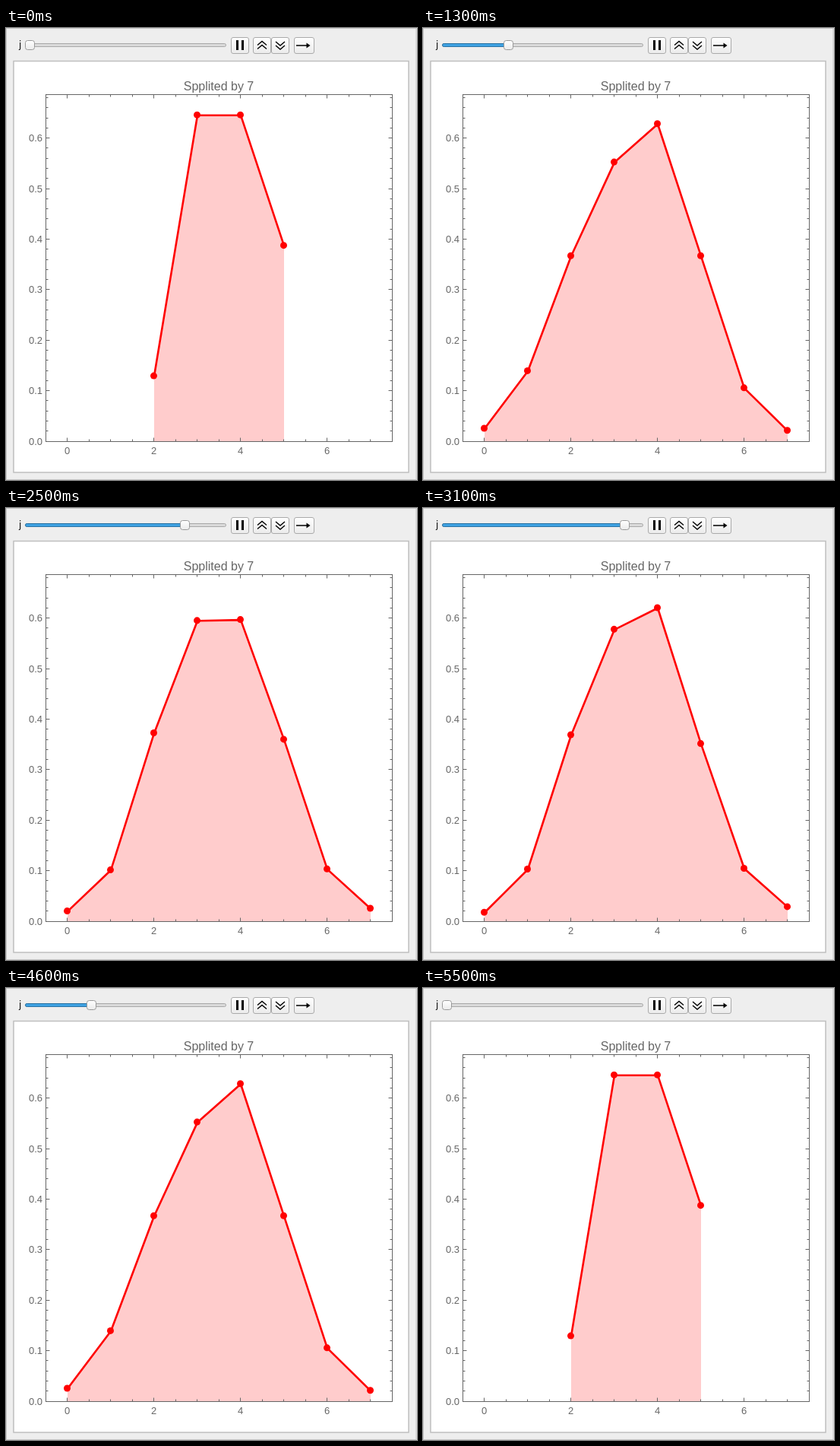
An HTML page for the animation above (6 s loop, 541x594 px).

```html
<!DOCTYPE html>
<html lang="en">
<head>
<meta charset="utf-8">
<title>Spplited by 7</title>
<style>
  html, body { margin: 0; width: 100%; height: 100%; overflow: hidden; background: #eee; }
  svg { display: block; }
  text { font-family: "Liberation Sans", Arial, sans-serif; font-size: 13px; fill: #666; }
  .button { fill: url(#face); stroke: #aaa; }
  .icon { fill: none; stroke: #000; stroke-width: 1.4; }
  .frame { fill: none; stroke: #666; }
</style>
</head>
<body>
<svg width="541" height="594" viewBox="0 0 541 594">
  <defs>
    <linearGradient id="face" x2="0" y2="1">
      <stop stop-color="#fff"/><stop offset="1" stop-color="#ebebeb"/>
    </linearGradient>
    <clipPath id="plot"><rect x="52" y="87" width="457" height="457"/></clipPath>
  </defs>
  <rect x=".5" y=".5" width="539.5" height="593" fill="#eee" stroke="#c6c6c6"/>
  <rect x="10" y="43.5" width="520" height="540.5" fill="#fff" stroke="#bfbfbf" stroke-width="1.5"/>

  <text x="17" y="26" style="font: 12px 'DejaVu Sans', sans-serif; fill: #000">j</text>
  <rect x="25.5" y="20.5" width="264" height="4" rx="2" fill="#dadada" stroke="#a8a8a8"/>
  <rect id="filled" x="25.5" y="20.5" height="4" rx="2" fill="#3fa2e2" stroke="#2b72a3"/>
  <rect id="thumb" y="16.5" width="12" height="12" rx="3" fill="url(#face)" stroke="#999"/>

  <rect class="button" x="296.5" y="12.5" width="23" height="21" rx="2.5"/>
  <rect class="button" x="325.5" y="12.5" width="23" height="21" rx="2.5"/>
  <rect class="button" x="349.5" y="12.5" width="23" height="21" rx="2.5"/>
  <rect class="button" x="379.5" y="12.5" width="26" height="21" rx="2.5"/>
  <path d="M303 16h3v13h-3zM310 16h3v13h-3z"/>
  <path class="icon" d="M331 22.5l6-5 6 5M331 27.5l6-5 6 5M355 18l6 5 6-5M355 23l6 5 6-5M382 23h15"/>
  <path d="M395.500 19.500l5 3.500-5 3.500z"/>

  <text x="280" y="82" text-anchor="middle" style="font-size: 16px">Spplited by 7</text>
  <g clip-path="url(#plot)">
    <polygon id="area" fill="#fcc"/>
    <polyline id="line" fill="none" stroke="red" stroke-width="2.6" stroke-linejoin="round"/>
    <g id="dots" fill="red"></g>
  </g>
  <rect class="frame" x="52.5" y="87.5" width="456" height="456"/>
  <path id="ticks" class="frame"/>
  <g id="labels"></g>
</svg>
<script>
const $ = id => document.getElementById(id);
const BLOCK = 7, FIRST = 100, LAST = 10000, STEPS = 25;
const px = x => 80.5 + 57 * x;
const py = y => 542.8 - 664 * y;

// Centre column of the Rule 30 cellular automaton
function rule30(length) {
  const bits = [];
  for (let row = 1n, n = 0; n < length; n++) {
    bits.push(Number((row >> BigInt(n)) & 1n));
    row ^= (row << 1n) | (row << 2n);
  }
  return bits;
}

// Normalised tally of ones per block, for the first `length` bits
function tally(bits, length) {
  const counts = Array(BLOCK + 1).fill(0);
  for (let i = 0; i + BLOCK <= length; i += BLOCK) {
    counts[bits.slice(i, i + BLOCK).reduce((a, b) => a + b)]++;
  }
  const norm = Math.hypot(...counts);
  return counts.map((c, x) => [x, c / norm]).filter(([, y]) => y > 0);
}

const column = rule30(LAST);
const tallies = Array.from({ length: STEPS + 1 }, (_, k) =>
  tally(column, FIRST + (LAST - FIRST) / STEPS * k));

const thumbKeys = [[0, 31.5], [1, 31.5], [9, 112.5], [15, 175.5], [24, 265.5], [25, 275.5]];
function thumbAt(k) {
  const i = Math.max(1, thumbKeys.findIndex(([key]) => key >= k));
  const [k0, x0] = thumbKeys[i - 1], [k1, x1] = thumbKeys[i];
  return Math.round(x0 + (x1 - x0) * (k - k0) / (k1 - k0) - .5) + .5;
}

function drawAxes() {
  let ticks = '', labels = '';
  const snap = v => Math.floor(v) + .5;
  for (let i = 0; i <= 14; i++) {
    const x = snap(px(i / 2)), size = i % 4 ? 3 : 5;
    ticks += `M${x} 543.5v${-size}M${x} 87.5v${size}`;
    if (i % 4 === 0) labels += `<text x="${x}" y="560" text-anchor="middle">${i / 2}</text>`;
  }
  for (let i = 0; i <= 34; i++) {
    const y = snap(py(i / 50) + .3), size = i % 5 ? 3 : 5;
    ticks += `M52.5 ${y}h${size}M508.5 ${y}h${-size}`;
    if (i % 5 === 0) labels += `<text x="48" y="${y + 4}" text-anchor="end">${(i / 50).toFixed(1)}</text>`;
  }
  $('ticks').setAttribute('d', ticks);
  $('labels').innerHTML = labels;
}

function draw(k) {
  const thumb = thumbAt(k);
  $('thumb').setAttribute('x', thumb - 6);
  $('filled').setAttribute('width', thumb - 25.5);

  const points = tallies[k].map(([x, y]) => [px(x), py(y)]);
  const path = points.map(([x, y]) => `${x + .5},${y + .5}`).join(' ');
  $('line').setAttribute('points', path);
  $('area').setAttribute('points',
    `${points[0][0] + .5},543.5 ${path} ${points[points.length - 1][0] + .5},543.5`);
  $('dots').innerHTML = points.map(([x, y]) => `<circle cx="${x}" cy="${y}" r="4.5"/>`).join('');
}

let shown = -1;
function tick() {
  const s = Math.floor(performance.now() % 6000 / 100);
  const k = Math.max(0, Math.min(s - 4, 55 - s, STEPS));
  if (k !== shown) draw(shown = k);
  requestAnimationFrame(tick);
}

drawAxes();
tick();
</script>
</body>
</html>
```
